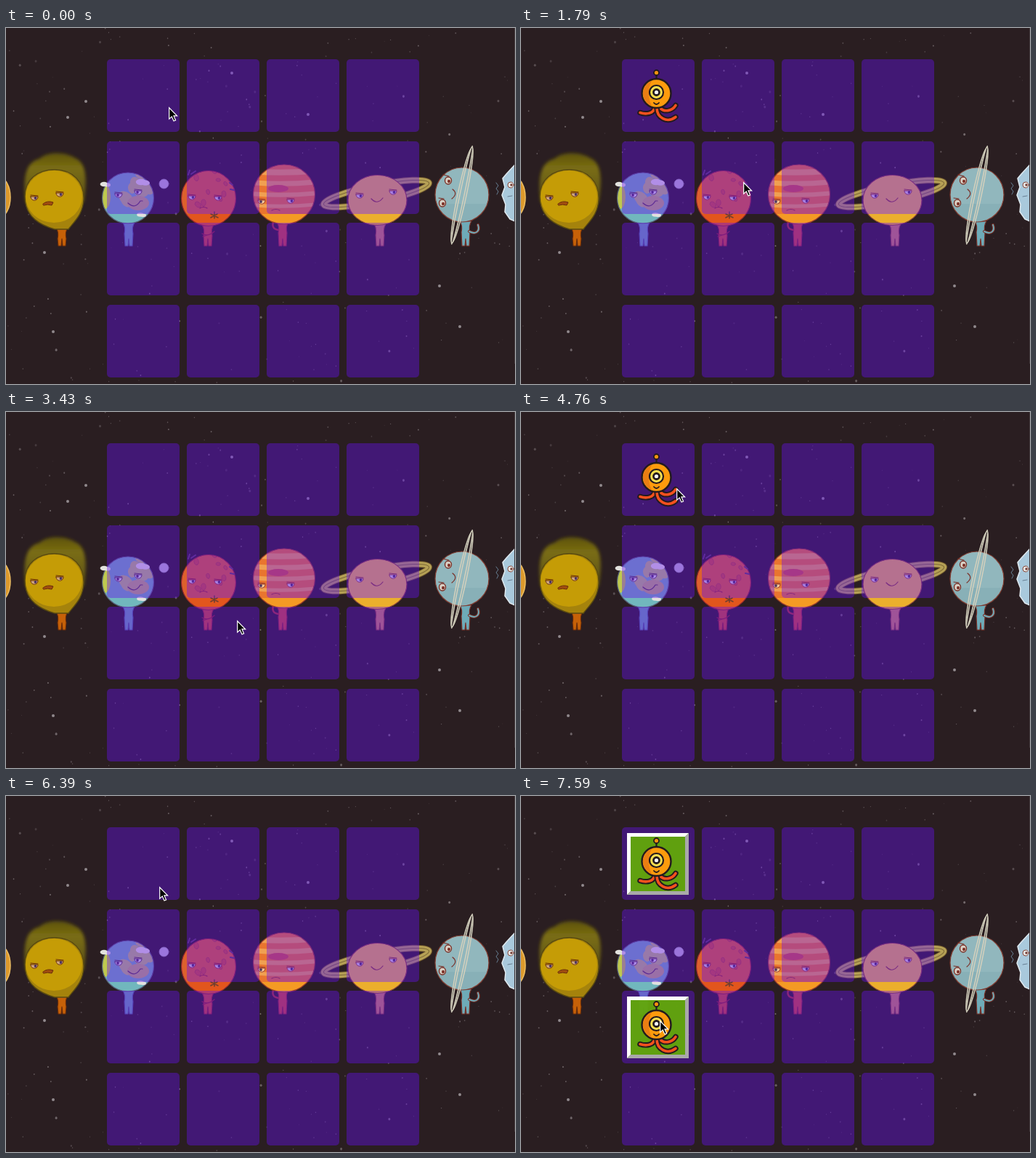
Write an HTML page that moves like this. It is 701 px wide and 490 px high and loops after 8000 ms.

```html
<!DOCTYPE html>
<html lang="en">
<head>
<meta charset="utf-8">
<title>Space memory game</title>
<style>
html, body { margin: 0; width: 100%; height: 100%; overflow: hidden; background: #2a1e21; }
svg { display: block; width: 701px; height: 490px; }
</style>
</head>
<body>
<svg viewBox="0 0 701 490">
  <defs>
    <filter id="soft" x="-20%" y="-20%" width="140%" height="140%"><feGaussianBlur stdDeviation="2.2"/></filter>
    <linearGradient id="haze" x2="0" y2="1"><stop stop-color="#5d5210"/><stop offset=".3" stop-color="#7a6d12"/><stop offset="1" stop-color="#5b5012"/></linearGradient>
  </defs>
  <rect width="701" height="490" fill="#2a1e21"/>
  <g id="stars" fill="#b3abae"></g>
  <g id="planets" stroke-linecap="round" stroke-linejoin="round"></g>
  <g id="cards" fill="#6610f2" fill-opacity=".4"></g>
  <path d="M700.5 0V462" stroke="#40373a"/>
  <g id="pieces" stroke-linecap="round" stroke-linejoin="round"></g>
  <path id="cursor" d="M.7 .8V16.200L4.300 12.900 7 19 9.600 17.900 7 11.900H11.600Z" stroke="#fff" stroke-width="1.200"/>
</svg>
<script>
const LOOP = 8000;
const STEP = 148.6; // the picture advances in ticks of this many ms
const INK = '#231a1e';
const byId = id => document.getElementById(id);

const path = (d, fill = 'none', stroke = 'none', w = 1) =>
  `<path d="${d}" fill="${fill}" stroke="${stroke}" stroke-width="${w}"/>`;
const oval = (x, y, rx, ry, fill, stroke = 'none', w = 1, turn = 0) =>
  `<ellipse cx="${x}" cy="${y}" rx="${rx}" ry="${ry}" fill="${fill}" stroke="${stroke}" stroke-width="${w}" transform="rotate(${turn} ${x} ${y})"/>`;
const line = (d, color, w = 1.2) => path(d, 'none', color, w);
const group = (attrs, ...parts) => `<g ${attrs}>${parts.join('')}</g>`;
const repeat = (n, make) => Array.from({ length: n }, (_, i) => make(i)).join('');

function seeded(seed) {
  return () => (seed = (seed * 16807) % 2147483647) / 2147483647;
}

function stars() {
  const rnd = seeded(4177);
  const bright = [[311, 62], [416, 119], [85, 123], [53, 309], [65, 418], [597, 355], [625, 411], [110, 101]];
  const small = repeat(240, i => {
    const r = i % 14 ? .4 + rnd() * .6 : 1.5;
    return group(`opacity="${(.15 + rnd() * .4).toFixed(2)}"`, oval(rnd() * 700, rnd() * 490, r, r * 1.2, 'inherit'));
  }).replaceAll(' fill="inherit"', '');
  return small + bright.map(([x, y]) => oval(x, y, 2, 2, '#918a8d')).join('');
}

// Torso and two legs hanging from the point x, y down to the ground
const body = (x, y, fill, ink) => path(
  `M${x - 8} ${y}q4 6 2 15L${x - 5} 300h4l1-10 1 10h4L${x + 6} ${y + 15}q-2-9 2-15z`, fill, ink, 1.1);

// Ball with everything in "marks" cut to its edge
function globe(id, x, y, rx, ry, fill, ink, marks = '') {
  return `<clipPath id="${id}"><ellipse cx="${x}" cy="${y}" rx="${rx}" ry="${ry}"/></clipPath>` +
    oval(x, y, rx, ry, fill) + group(`clip-path="url(#${id})"`, marks) + oval(x, y, rx, ry, 'none', ink, 1.2);
}

// Seeded blotches spread over a ball
function blotches(seed, n, x, y, reach, size, fill, ink) {
  const rnd = seeded(seed);
  return repeat(n, () => {
    const a = rnd() * Math.PI * 2, d = Math.sqrt(rnd()) * reach, r = size * (.5 + rnd() * .6);
    return oval(x + d * Math.cos(a), y + d * Math.sin(a), r, r * .7, fill, ink, .8, rnd() * 90);
  });
}

// Half-lidded eye, dx sets where it looks
const eye = (x, y, ink, white = '#d3cbd4', dx = 1.5) =>
  path(`M${x - 5} ${y - 1}h10c0 7-10 7-10 0z`, white, ink, 1) +
  oval(x + dx, y + 1, 1.8, 2, '#4c3562') + line(`M${x - 5} ${y - 3}l10 1`, ink, 1);

const sun = () => oval(-9, 233, 15, 27, '#dd9a2c', '#efbf62', 1.5);

function venus() {
  const ink = '#6a2d0b';
  return group('filter="url(#soft)"', path('M27 240C22 200 30 184 46 180 60 168 85 172 95 179 111 185 112 209 107 240Z', 'url(#haze)')) +
    body(77, 275, '#c66108', ink) +
    path('M26 232C26 208 44 195 67 195 92 195 108 212 107 236 106 258 92 268 86 277H67C50 272 26 262 26 232Z', '#a5830c', '#594a10', 1.4) +
    oval(66, 232, 39, 36, '#c59c06') +
    eye(39, 233, ink, '#cfa67a') + eye(74, 228, ink, '#cfa67a') +
    path('M51 242q6-5 14-2l-2 4q-6-2-11 0z', '#a14d10', ink);
}

function earth() {
  const ink = '#543c55';
  const land = blotches(911, 9, 176, 219, 27, 11, '#b9bf78') + oval(136, 232, 8, 17, '#bec94f') +
    oval(182, 241, 15, 10, '#bcae74') + path('M130 256h75v16h-75z', '#71b7bd');
  const cloud = (x, y, s) => oval(x, y, 6 * s, 3.5 * s, '#e2e2de') + oval(x + 5 * s, y + s, 5 * s, 3 * s, '#e2e2de');
  return body(169, 268, '#669fb0', '#4b6291') +
    globe('earth', 168, 234, 35.5, 35, '#70afb9', '#56607a', land) +
    cloud(135, 215, .9) + cloud(186, 212, 1.2) + cloud(185, 257, .8) +
    eye(155, 229, ink, '#d8dbe0', -1) + eye(182, 225, ink, '#d8dbe0', -1) +
    line('M168 241q10 9 17-3l3 0', ink) + oval(217.5, 214.5, 6.5, 6.5, '#bdb9cd', '#9b9ba8', .8);
}

function mars() {
  const ink = '#8f2630';
  const marks = path('M240 256h80v20h-80z', '#e2561d') + blotches(353, 9, 279, 228, 32, 4.5, '#cd5233', '#b04538');
  return body(278, 271, '#c54b31', ink) + line('M270 283q8 5 17-3M271 287l13-4', ink) +
    globe('mars', 279, 234.5, 37.5, 38, '#dd612d', ink, marks) +
    line('M251 202l2-6M255 201l6-4M308 213l4 3M309 222l5 1', '#5b3d67', 2) +
    eye(256, 232, ink) + eye(292, 233, ink) + line('M267 248q5-3 10 0', ink) +
    line('M282 256l10 5M287 253v9M291 256l-9 5', '#6e3f30', 1.6);
}

function jupiter() {
  const ink = '#963a2b';
  const bands = repeat(4, i => path(`M338 ${193 + i * 16}q45 4 92-1v${8 - i}q-47 5-92 1z`, '#f0a052')) +
    path('M338 256h92v16h-92z', '#f49a24') + oval(375, 221, 14, 5, '#cf5140');
  return body(381, 267, '#c64835', '#8f2b39') + line('M375 278q-11-2-6-13', '#a3332f', 2.5) +
    globe('jupiter', 383, 229, 42.5, 41, '#e9752f', ink, bands) +
    eye(352, 238, ink, '#f4c797', -1) + eye(392, 237, ink) + line('M366 251q6-3 11 0', ink);
}

function saturn() {
  const ink = '#86403a';
  const ring = (w, color) => oval(510, 228, 74, 11.5, 'none', color, w, -11.5);
  return ring(9.5, '#5a4426') + ring(7.5, '#b5a055') + ring(1, '#7d6836') +
    body(515, 270, '#c4805b', ink) +
    globe('saturn', 511.5, 237, 40.5, 34.5, '#e9b24c', ink, path('M470 256h84v20h-84z', '#ebaf2d')) +
    eye(487, 230, ink) + eye(533, 225, ink) + line('M503 235q8 9 16-1', ink);
}

function uranus() {
  const ink = '#7b3027';
  const arm = 'M638 280c10 5 15-1 12-9';
  const roundEye = (x, y) => oval(x, y, 4.5, 5, '#d8cfc4', ink, 1.4) + oval(x + 1, y + 1, 2, 2.3, ink);
  return body(633, 266, '#6eabb8', ink) + line(arm, ink, 4) + line(arm, '#6eabb8', 2) +
    globe('uranus', 628, 229.5, 37, 37.5, '#91b7bd', '#803d32', path('M590 242h76v26h-76z', '#88b0b7')) +
    roundEye(609, 210) + roundEye(601, 241) + line('M615 222q8 6-1 13M602 202l8 2M596 234l7 1', ink) +
    repeat(2, i => oval(628, 230, 3 + i * 3, 69 - i * 2, 'none', '#d3d0bd', 1.5, 12));
}

function neptune() {
  return path('M701 188l-12 13-5 6 3 12-4 11 5 13-1 10 7 10 7 3z', '#a9c9dc', '#dfe9ef', 1.5) +
    oval(695, 216, 4, 4, '#e7e8e7', '#874638') + oval(696, 216, 1.6, 1.8, '#743b34') +
    line('M675 213l3 4-3 4 3 4-2 4M691 232l6-1', '#677f93', 1);
}

// Outlined limb: dark stroke beneath, colour on top
const limb = (d, color) => line(d, INK, 7.5) + line(d, color, 3.6);

// Three curling arms that hang from the point x, y
const tentacles = (x, y, color) =>
  limb(`M${x - 3} ${y}c-1 8-11 10-20 7`, color) +
  limb(`M${x + 4} ${y}c6 7 17 5 22-3`, color) +
  limb(`M${x} ${y}c0 14 14 22 26 13`, color);

function orangeAlien() {
  return tentacles(187, 109.5, '#f4511e') +
    line('M186.5 64v7', INK, 2.2) + oval(186.5, 61.5, 3.5, 3.5, '#f9930f', INK, 1.8) +
    oval(186.5, 90, 20, 20, '#fd9b0d', INK, 2.4) +
    path('M180 73c-16 6-16 28 0 34-5-10-6-23 0-34z', '#e97e13') +
    oval(186.5, 88.5, 9.5, 9.5, '#f8df50', INK, 2.2) + oval(186.5, 88.5, 4, 4, '#fff', INK, 2.8) +
    line('M183 103q3.500 4 7 0', INK, 1.8);
}

function blueAlien() {
  const stalkEye = x => oval(x, 176, 6.6, 6.6, '#f6da38', INK, 2.2) + oval(x, 176, 2, 2, '#fff', INK, 1.7);
  return tentacles(298, 218, '#4589a4') +
    line('M286 181l11 11M311 181l-11 11', INK, 2.3) + stalkEye(282) + stalkEye(315) +
    path('M273 194h49v23.500h-49z', '#90caf3', INK, 2.4) + path('M274.500 195.500h7l-3 20.500h-4z', '#5aa2cf') +
    path('M291 204h15q0 9-8 9-7 0-7-9z', INK);
}

function greenAlien() {
  const side = s => group(`transform="translate(299 0) scale(${s} 1)"`,
    limb('M18 323c12 4 17-3 16-12', '#78b83b'), limb('M8 340v12h6', '#78b83b'), line('M9 297l5-11', INK, 2.2),
    oval(14, 285, 3, 3, '#f6da38', INK, 1.8));
  const face = s => oval(299 + s * 8, 313, 5, 5, '#fff', INK, 2) + oval(299 + s * 7, 314, 1.6, 1.6, INK);
  return side(-1) + side(1) + oval(299, 319, 22, 24, '#8bcb45', INK, 2.4) + face(-1) + face(1) +
    line('M291 327q8 7 16 0', INK, 2);
}

const matchTile = () =>
  group('opacity=".95"', path('M146 51h85v85h-85z', '#62a80a')) +
  path('M146 136V51h85l-5 5h-75v75z', '#fff') + path('M231 51v85h-85l5-5h75V56z', '#a9a9a9');

function build() {
  byId('stars').innerHTML = stars();
  byId('planets').innerHTML = [sun, venus, earth, mars, jupiter, saturn, uranus, neptune].map(f => f()).join('');
  byId('cards').innerHTML = repeat(16, i =>
    `<rect x="${139 + i % 4 * 110}" y="${Math.round(43 + (i >> 2) * 112.5)}" width="100" height="100" rx="5"/>`);
  byId('pieces').innerHTML =
    group('id="tile"', matchTile()) +
    group('id="first"', orangeAlien()) +
    group('id="green"', greenAlien()) +
    group('id="blue"', blueAlien()) +
    group('id="pair" transform="translate(0 225)"', matchTile(), orangeAlien());
}

// Ticks at which each piece turns face up and down again
const shown = {
  first: [[6, 23], [32, 42], [47, 54]],
  green: [[17, 23]],
  blue: [[36, 42]],
  tile: [[51, 54]],
  pair: [[51, 54]]
};

// Pointer moves: first tick, last tick, goal
const home = [224, 109];
const moves = [
  [8, 10, 281, 171], [11, 12, 306, 212], [12, 14, 326, 262], [14, 16, 318, 287],
  [25, 27, 230, 142], [28, 30, 214, 105], [32, 36, 292, 202], [40, 44, 197, 112], [47, 51, 191, 309]
];

function pointerAt(tick) {
  let [x, y] = home;
  for (const [a, b, gx, gy] of moves) {
    const p = Math.min(1, Math.max(0, (tick - a) / (b - a)));
    const ease = (1 - Math.cos(Math.PI * p)) / 2;
    x += (gx - x) * ease;
    y += (gy - y) * ease;
  }
  return `translate(${Math.round(x)} ${Math.round(y)})`;
}

function render(t) {
  const tick = Math.floor(t / STEP);
  for (const id in shown) {
    const on = shown[id].some(([a, b]) => tick >= a && tick < b);
    byId(id).setAttribute('visibility', on ? 'visible' : 'hidden');
  }
  byId('cursor').setAttribute('transform', pointerAt(tick));
}

build();
const start = performance.now();
function frame() {
  render((performance.now() - start) % LOOP);
  requestAnimationFrame(frame);
}
frame();
</script>
</body>
</html>
```
